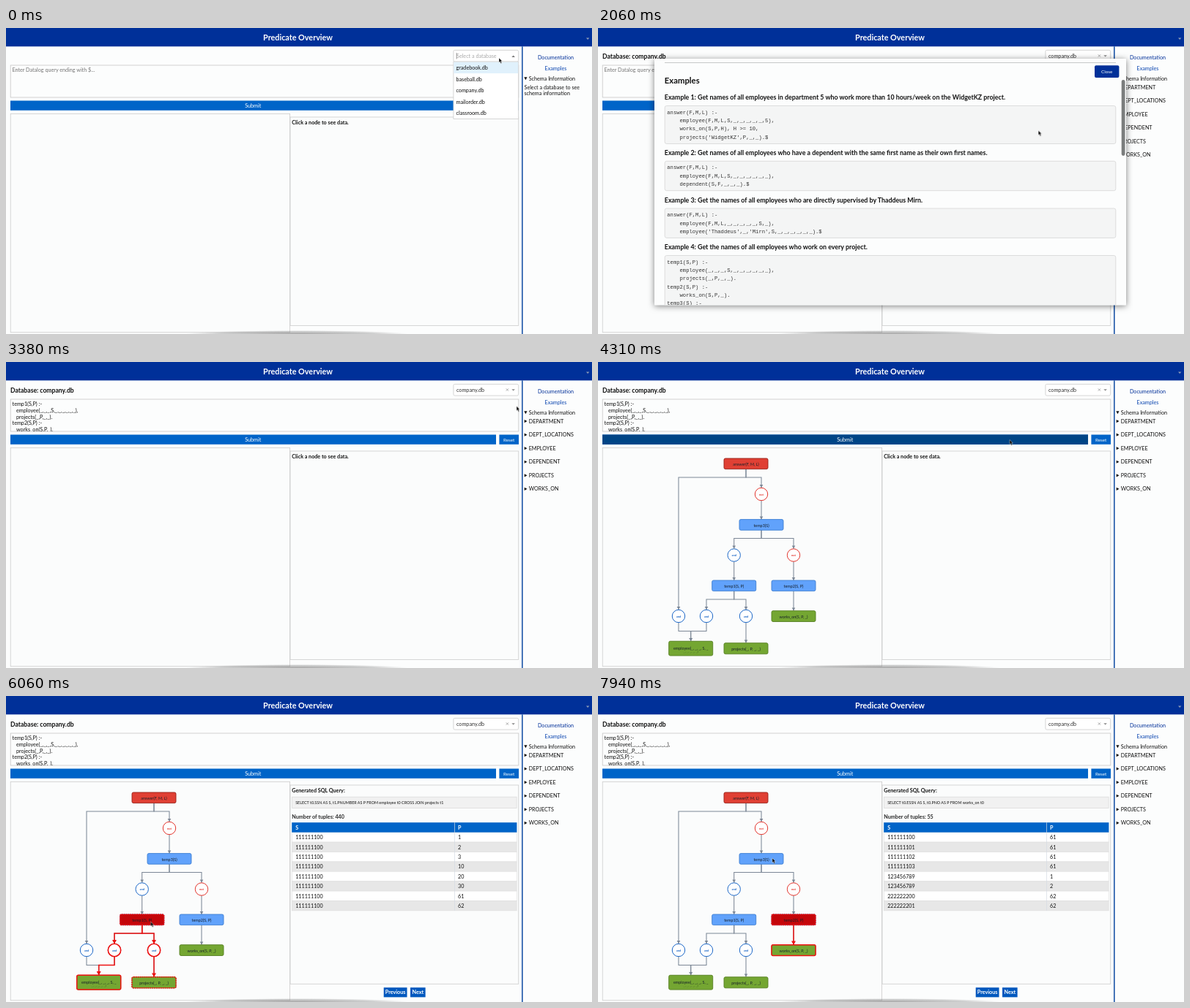
These frames come from a looping animation (800 px wide and 419 px high, 8 s). An HTML page:

```html
<!DOCTYPE html>
<html lang="en">
<head>
<meta charset="utf-8">
<title>Predicate Overview</title>
<style>
html, body { margin: 0; width: 100%; height: 100%; overflow: hidden; background: #fcfdfd; }
svg { display: block; width: 800px; height: 419px; }
text { font-family: Lato, sans-serif; white-space: pre; }
.mono { font-family: "Liberation Mono", monospace; }
#pointer { animation: travel 8s infinite; animation-timing-function: ease-in-out; }
@keyframes travel {
  0%, 1% { transform: translate(673px, 41px); }
  5%, 6.8% { transform: translate(648px, 84px); }
  14%, 19.5% { transform: translate(742px, 53px); }
  27%, 31% { transform: translate(593px, 145.5px); }
  35.5%, 37% { transform: translate(220px, 328px); }
  40.8%, 43% { transform: translate(697px, 60.5px); }
  48.8%, 55% { transform: translate(562px, 106.5px); }
  65%, 81% { transform: translate(197.5px, 309px); }
  86%, 89.5% { transform: translate(268px, 306px); }
  97%, 100% { transform: translate(238px, 222px); }
}
#active { animation: pick 8s step-end infinite; }
@keyframes pick {
  0% { transform: none; }
  2.9% { transform: translateY(15.6px); }
  4% { transform: translateY(31.2px); }
}
</style>
</head>
<body>
<script>
const LOOP = 8000;
const NAVY = '#003099', BLUE = '#0064c8', INK = '#111', RED = '#ee1111', EDGE = '#7c8796';
let css = '', spans = 0;

const rect = (x, y, w, h, fill, stroke = 'none', extra = '') =>
  `<rect x="${x}" y="${y}" width="${w}" height="${h}" fill="${fill}" stroke="${stroke}" stroke-width=".8" ${extra}/>`;

// y is the middle of the capitals
const text = (x, y, s, { size = 7.2, fill = INK, bold, mid, mono, extra = '' } = {}) =>
  `<text x="${x}" y="${y + size * (mono ? .3 : .36)}" font-size="${size}" fill="${fill}"` +
  `${bold ? ' font-weight="700"' : ''}${mid ? ' text-anchor="middle"' : ''}${mono ? ' class="mono"' : ''} ${extra}>` +
  s.replace(/</g, '&lt;').replace(/>/g, '&gt;') + '</text>';

const path = (d, fill, extra = '') => `<path d="${d}" fill="${fill}" ${extra}/>`;

// shows the content between two times of the loop
function during(from, to, content) {
  const name = 'span' + spans++, pct = t => t / LOOP * 100 + '%';
  css += `@keyframes ${name}{0%{opacity:0}${pct(from)}{opacity:1}` +
    (to < LOOP ? `${pct(to)}{opacity:0}` : '100%{opacity:1}') + '}' +
    `.${name}{animation:${name} ${LOOP}ms step-end infinite}`;
  return `<g class="${name}">${content}</g>`;
}

const CHOSEN = 520, OPEN = 1450, FILLED = 2900, CLOSED = 3330, DRAWN = 4040, FIRST = 5300, SECOND = 6960;

function frame() {
  return rect(0, 0, 800, 419, '#fcfdfd') +
    rect(0, 0, 800, 25.3, NAVY) +
    text(398.5, 13, 'Predicate Overview', { size: 10.8, fill: '#fff', bold: 1, mid: 1 }) +
    path('M792 13.5h4.4l-2.2 2.4z', '#8f9db8') +
    rect(704, 25.3, 1.6, 394, '#1c55a8') +
    rect(610.9, 30.4, 88.7, 15.6, '#fff', '#ccc', 'rx="1.8"') +
    rect(6.2, 51, 693.6, 44, '#fcfdfd', '#c6c6c6') +
    rect(6, 99.5, 663, 13.3, BLUE) +
    during(3720, 4490, rect(6, 99.5, 663, 13.3, '#004586')) +
    text(337.3, 106.2, 'Submit', { fill: '#fff', mid: 1 }) +
    rect(673.4, 99.5, 26.6, 13.3, BLUE) +
    text(686.6, 106.3, 'Reset', { size: 6.3, fill: '#fff', mid: 1 }) +
    rect(6.2, 117.5, 381.4, 299.3, '#fbfcfc', '#ccc') +
    during(0, FIRST, rect(388, 122, 311.7, 285.4, '#fbfcfc', '#ccc') +
      text(390.3, 129, 'Click a node to see data.', { bold: 1 }));
}

function sidebar() {
  const tables = ['DEPARTMENT', 'DEPT_LOCATIONS', 'EMPLOYEE', 'DEPENDENT', 'PROJECTS', 'WORKS_ON'];
  return text(750.5, 40, 'Documentation', { fill: NAVY, mid: 1 }) +
    text(750.5, 55, 'Examples', { fill: '#0a45b0', mid: 1 }) +
    during(1090, 1740, rect(736, 58.7, 29.5, .6, '#0a45b0')) +
    path('M707.3 67.2h4.2l-2.1 4z', INK) +
    text(713.7, 69, 'Schema Information') +
    during(0, CHOSEN, text(707.5, 81, 'Select a database to see') + text(707.5, 89.7, 'schema information')) +
    during(CHOSEN, LOOP, tables.map((s, i) => {
      const y = 81 + i * 18.55;
      return path(`M707.7 ${y - 2}v4.2l3.8-2.1z`, INK) + text(713.7, y, s);
    }).join(''));
}

function queryBox() {
  const code = [[8.6, 'temp1(S,P) :-'], [14, 'employee(_,_,_,S,_,_,_,_,_,_),'], [14, 'projects(_,P,_,_).'],
    [8.6, 'temp2(S,P) :-'], [14, 'works_on(S,P,_).']];
  return during(0, FILLED, text(8.4, 57.8, 'Enter Datalog query ending with $...', { fill: '#757575' })) +
    during(FILLED, LOOP, '<g clip-path="url(#query)">' +
      code.map(([x, s], i) => text(x, 57.8 + i * 8.7, s)).join('') + '</g>');
}

function databasePicker() {
  const files = ['gradebook.db', 'baseball.db', 'company.db', 'mailorder.db', 'classroom.db'];
  return during(0, CHOSEN,
    text(615, 38.2, 'Select a database', { fill: '#aaa' }) + rect(614.8, 34, .6, 8.5, '#555') +
    path('M690.3 40h4.6l-2.3-2.4z', '#777') +
    rect(610.9, 46.2, 88.7, 78.3, '#fff', '#ccc') +
    rect(611.3, 46.7, 87.9, 15.4, '#e0f1fc', 'none', 'id="active"') +
    files.map((s, i) => text(614.5, 54.4 + i * 15.6, s)).join('')) +
    during(CHOSEN, LOOP,
      text(6, 38.4, 'Database: company.db', { size: 8.64, bold: 1 }) +
      text(615, 38.2, 'company.db', { fill: '#333' }) +
      path('M682.8 36.4l3.2 3.2m0-3.2l-3.2 3.2', 'none', 'stroke="#888" stroke-width=".7"') +
      path('M690.3 37.2h4.6l-2.3 2.4z', '#888'));
}

// an edge that ends in an arrow pointing down, unless it is plain
function edge(points, hot, plain) {
  const color = hot ? RED : EDGE, w = hot ? 1.5 : 1.05, a = hot ? 3 : 2.3;
  const [x, y] = points[points.length - 1];
  return path('M' + points.join('L'), 'none', `stroke="${color}" stroke-width="${w}"`) +
    (plain ? '' : path(`M${x - a} ${y - a * 1.7}h${2 * a}L${x} ${y}z`, color));
}

function box(cx, y, h, fill, stroke, label, { dash, hot, more } = {}) {
  return rect(cx - 30, y, 60, h, fill, 'none', 'rx="1.8"') +
    path(`M${cx - 28} ${y}h56q2 0 2 2v${h - 4}q0 2-2 2h-56q-2 0-2-2v${4 - h}q0-2 2-2z`, 'none',
      `stroke="${stroke}" stroke-width="${hot ? 1.5 : .9}" ${dash ? 'stroke-dasharray="2 .9"' : ''}`) +
    text(cx, y + h / 2 + (more ? -.2 : 1.2), label, { size: 5.4, mid: 1, fill: '#17202a' }) +
    (more ? text(cx, y + h / 2 + 4.6, more, { size: 4.5, mid: 1, fill: '#3d5a20' }) : '');
}

function gate(x, y, label, hot) {
  const color = label === 'not' ? '#e2332b' : '#1a66c6';
  return `<circle cx="${x}" cy="${y}" r="8.7" fill="#fff" stroke="${hot ? RED : color}" stroke-width="${hot ? 1.6 : 1}"/>` +
    text(x, y + .2, label, { size: 4, fill: color, bold: 1, mid: 1 });
}

const GREEN = '#74a632', SKY = '#61a2fb';
const temp = (x, y, label, hot) =>
  box(x, y, 14.6, hot ? '#c4060a' : SKY, hot ? RED : '#3f7fd2', label, { dash: hot, hot });
const employee = hot => box(126.7, 382.3, 19.8, GREEN, hot ? RED : '#567f22', 'employee(_, _, _, S, _', { hot, more: '_, _, _, _, _)' });
const projects = hot => box(202, 384.8, 15, GREEN, hot ? RED : '#567f22', 'projects(_, P, _, _)', { hot, dash: hot });
const worksOn = hot => box(267, 340.7, 14.8, GREEN, hot ? RED : '#567f22', 'works_on(S, P, _)', { hot });

function graph() {
  return edge([[202, 147], [202, 158], [110, 158], [110, 339]]) +
    edge([[202, 147], [202, 158], [223, 158], [223, 172]]) +
    edge([[223, 190], [223, 215.5]]) +
    edge([[223, 230], [223, 241.5], [185.7, 241.5], [185.7, 255.5]]) +
    edge([[223, 230], [223, 241.5], [267, 241.5], [267, 255.5]]) +
    edge([[185.7, 273], [185.7, 299]]) + edge([[267, 273], [267, 299]]) +
    edge([[110, 357], [110, 368.5], [126.7, 368.5], [126.7, 382]]) +
    box(202, 132, 14.6, '#e04034', '#982018', 'answer(F, M, L)') +
    gate(223, 181, 'not') + temp(223, 215.6, 'temp3(S)') +
    gate(185.7, 264.5, 'and') + gate(267, 264.5, 'not') + gate(110, 348, 'and');
}

function leftBranch(hot) {
  return edge([[185.7, 313], [185.7, 325], [148, 325], [148, 339]], hot) +
    edge([[185.7, 313], [185.7, 325], [202, 325], [202, 339]], hot) +
    edge([[148, 357], [148, 368.5], [126.7, 368.5], [126.7, 382]], hot) +
    edge([[202, 357], [202, 384.5]], hot) +
    gate(148, 348, 'and', hot) + gate(202, 348, 'and', hot) +
    temp(185.7, 299, 'temp1(S, P)', hot) + employee(hot) + projects(hot);
}

const rightBranch = hot =>
  edge([[267, 313], [267, 340.5]], hot) + temp(267, 299, 'temp2(S, P)', hot) + worksOn(hot);

function results(sql, count, rows) {
  const button = (x, w, s) => rect(x, 399.2, w, 13.2, '#0058be') +
    text(x + w / 2, 405.9, s, { fill: '#fff', bold: 1, mid: 1 });
  return rect(388, 122, 311.7, 272.3, '#fbfcfc', '#ccc') +
    text(390.3, 129, 'Generated SQL Query:', { bold: 1 }) +
    rect(390.6, 138.2, 306.5, 15.2, '#f1f1f1', '#dcdcdc') +
    text(395.2, 146, sql, { size: 5.4 }) +
    text(390.3, 165.4, 'Number of tuples: ' + count, { bold: 1, fill: '#2a2a2a' }) +
    rows.map(([s, p], i) => {
      const y = 186.7 + i * 13.4;
      return rect(390.4, y, 306.8, 13.4, i % 2 ? '#e7e7e7' : '#fff', '#dadada', 'stroke-opacity=".7"') +
        text(395.2, y + 6.9, s) + text(617, y + 6.9, p);
    }).join('') +
    rect(390.2, 173.2, 307.2, 13.5, BLUE) +
    text(395.2, 180.2, 'S', { fill: '#fff', bold: 1 }) + text(617, 180.2, 'P', { fill: '#fff', bold: 1 }) +
    rect(612.2, 173.2, .7, 120.7, '#d5dbe2') +
    button(515.7, 31.8, 'Previous') + button(552, 20.6, 'Next');
}

function modal() {
  const examples = [
    [94.4, 106.5, 52, '1: Get names of all employees in department 5 who work more than 10 hours/week on the WidgetKZ project.',
      ['answer(F,M,L) :-', '    employee(F,M,L,S,_,_,_,_,_,5),', '    works_on(S,P,H), H >= 10,', "    projects('WidgetKZ',P,_,_).$"]],
    [170.6, 182.3, 40.4, '2: Get names of all employees who have a dependent with the same first name as their own first names.',
      ['answer(F,M,L) :-', '    employee(F,M,L,S,_,_,_,_,_,_),', '    dependent(S,F,_,_,_).$']],
    [235.4, 247, 40.4, '3: Get the names of all employees who are directly supervised by Thaddeus Mirn.',
      ['answer(F,M,L) :-', '    employee(F,M,L,_,_,_,_,_,S,_),', "    employee('Thaddeus',_,'Mirn',S,_,_,_,_,_,_).$"]],
    [299.8, 311.5, 110, '4: Get the names of all employees who work on every project.',
      ['temp1(S,P) :-', '    employee(_,_,_,S,_,_,_,_,_,_),', '    projects(_,P,_,_).', 'temp2(S,P) :-', '    works_on(S,P,_).', 'temp3(S) :-']]
  ];
  return rect(77, 42, 644, 337.3, '#fcfdfd', 'none', 'filter="url(#shadow)" rx="1"') +
    '<g clip-path="url(#dialog)">' +
    rect(91, 47.2, 616, .8, '#b9bcbc') +
    text(90.8, 71.5, 'Examples', { size: 11.3, bold: 1 }) +
    examples.map(([titleY, y, h, title, lines]) =>
      text(90.8, titleY, 'Example ' + title, { size: 8.85, bold: 1 }) +
      rect(91.2, y, 615.6, h, '#f4f5f5', '#d6d6d6', 'rx="2.5"') +
      lines.map((s, i) => text(94.3, y + 9 + i * 11.35, s, { mono: 1, fill: '#333' })).join('')).join('') +
    '</g>' +
    rect(678, 51.2, 33.4, 16.8, NAVY, 'none', 'rx="2"') +
    text(694.7, 59.7, 'Close', { size: 6.3, fill: '#fff', mid: 1 }) +
    rect(714.7, 71, 4.8, 104, '#7b7d7d', 'none', 'rx="2.4"');
}

const defs = `<defs>
  <clipPath id="query"><rect x="6.6" y="51.4" width="692" height="43.2"/></clipPath>
  <clipPath id="dialog"><rect x="77" y="42" width="644" height="337.3"/></clipPath>
  <filter id="shadow" x="-5%" y="-8%" width="110%" height="116%"><feDropShadow dx="0" dy="1.5" stdDeviation="4" flood-opacity=".5"/></filter>
  <radialGradient id="dock"><stop offset="0" stop-color="#777" stop-opacity=".65"/>
    <stop offset=".7" stop-color="#888" stop-opacity=".4"/><stop offset="1" stop-color="#999" stop-opacity="0"/></radialGradient>
</defs>`;

const firstRows = [1, 2, 3, 10, 20, 30, 61, 62].map(p => ['111111100', '' + p]);
const secondRows = [0, 1, 2, 3].map(i => ['' + (111111100 + i), '61'])
  .concat([['123456789', '1'], ['123456789', '2'], ['222222200', '62'], ['222222201', '62']]);

const scene = defs + frame() + sidebar() + queryBox() + databasePicker() +
  during(DRAWN, LOOP, graph() + leftBranch() + rightBranch()) +
  during(FIRST, SECOND, leftBranch(true) +
    results('SELECT t0.SSN AS S, t1.PNUMBER AS P FROM employee t0 CROSS JOIN projects t1', 440, firstRows)) +
  during(SECOND, LOOP, rightBranch(true) +
    results('SELECT t0.ESSN AS S, t0.PNO AS P FROM works_on t0', 55, secondRows)) +
  '<ellipse cx="397" cy="419" rx="152" ry="5" fill="url(#dock)"/>' +
  during(OPEN, CLOSED, modal()) +
  `<g id="pointer">${path('M0 0v6.2l1.4-1.3 1.1 2.5 1.2-.5-1.1-2.4h1.9z', '#000', 'stroke="#fff" stroke-width=".4"')}</g>`;

document.body.innerHTML = `<style>${css}</style><svg viewBox="0 0 800 419">${scene}</svg>`;
</script>
</body>
</html>
```
